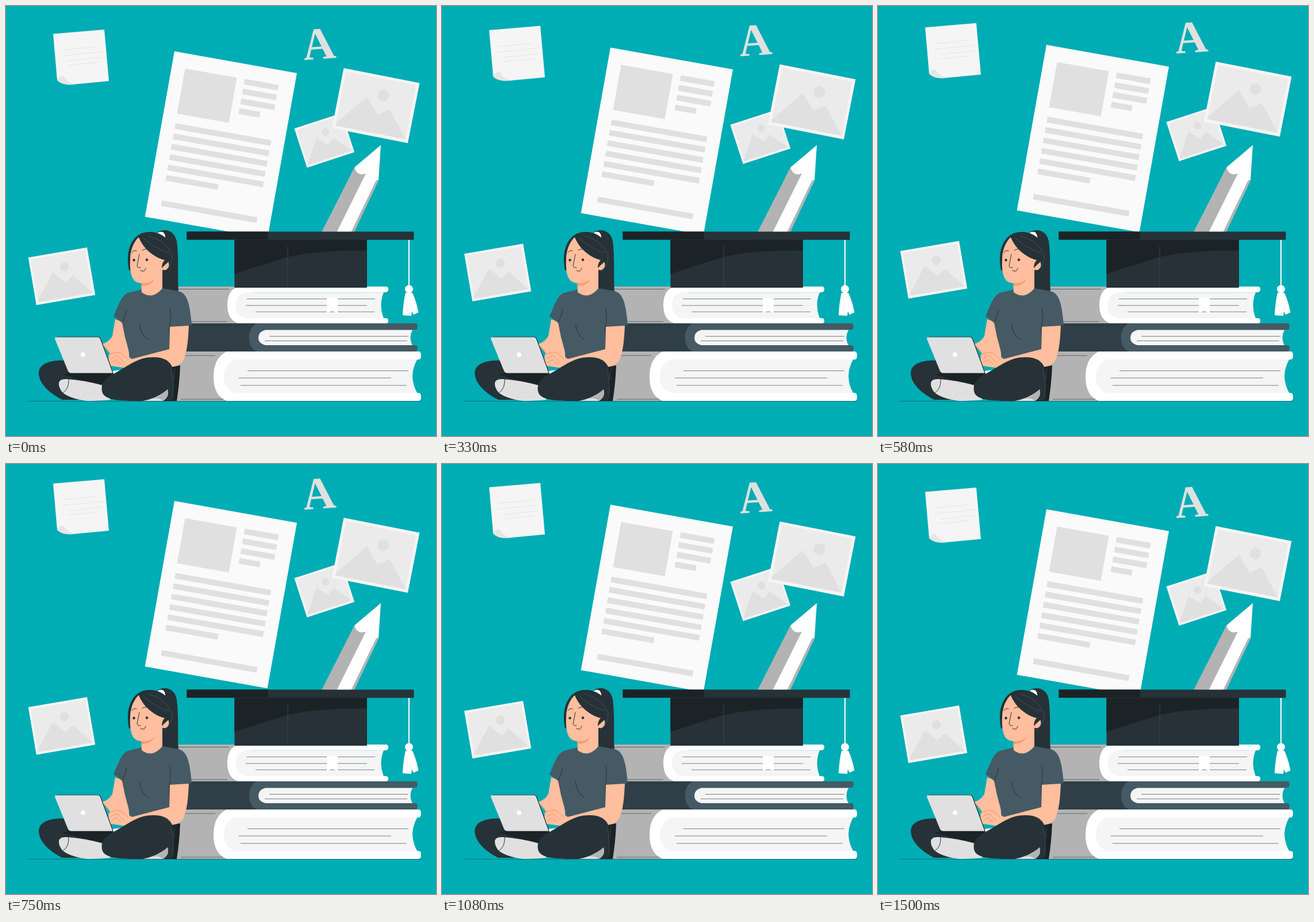
An HTML page for the animation above (1.54 s loop, 748x748 px).

```html
<!DOCTYPE html>
<html lang="en">
<head>
<meta charset="utf-8">
<title>Study time</title>
<style>
  html, body { margin: 0; width: 100%; height: 100%; overflow: hidden; background: #00adb5; }
  svg { display: block; width: 100vw; height: 100vh; }
  .paper { fill: #f5f5f5; }
  .pale { fill: #ebebeb; }
  .grey { fill: #e0e0e0; }
  .mid { fill: #b3b3b3; }
  .white { fill: #fff; }
  .ink { fill: #263238; }
  .deep { fill: #1b2326; }
  .slate { fill: #455a64; }
  .skin { fill: #ffbe9d; }
  .line { fill: none; stroke: #263238; stroke-width: 1; stroke-linecap: round; }
  .thin { fill: none; stroke: #263238; stroke-width: .6; }
  .rule { fill: none; stroke: #e0e0e0; stroke-width: .8; }
  .peach { fill: none; stroke: #f58a5c; stroke-width: .9; stroke-linecap: round; }
</style>
</head>
<body>
<svg viewBox="0 0 748 748" xmlns="http://www.w3.org/2000/svg">
  <defs>
    <g id="photo">
      <path class="paper" d="M0 0H134.5V106.5H0Z"/>
      <path class="pale" d="M5 5H129.5V101H5Z"/>
      <path class="grey" d="M5 97L48.9 41.4L73.5 68L92.3 55L129.5 101H5Z"/>
      <circle class="grey" cx="76.9" cy="33.8" r="10"/>
    </g>
  </defs>

  <rect width="748" height="748" fill="#00adb5"/>

  <g id="floats">
    <!-- sticky note -->
    <path class="paper" d="M82 48.5L171 41L179 130.5L121 136Q98 139 89 129Z"/>
    <path fill="#e6e6e6" d="M89 129Q92 121 100 121.5Q106 133 121 136Q98 139 89 129Z"/>
    <path class="rule" d="M99 76.5L158 71M99 86.5L168 79.5M107 96L167 89M107 103.5L159 98"/>

    <!-- document -->
    <g transform="translate(293 78.7) rotate(10.1)">
      <path fill="#fafafa" d="M0 0H216.4V292.5H0Z"/>
      <rect class="grey" x="23.5" y="26.3" width="91.5" height="79.7"/>
      <g id="text" class="grey"></g>
    </g>

    <text class="grey" transform="translate(547 92) rotate(-4) skewX(3)" text-anchor="middle"
      font-family="'Liberation Serif', serif" font-weight="700" font-size="79">A</text>

    <use href="#photo" transform="translate(501.5 213) rotate(-18) scale(.645 .673)"/>
    <use href="#photo" transform="translate(587.5 108) rotate(11.1)"/>
    <use href="#photo" transform="translate(38.7 437.5) rotate(-9.7) scale(.772 .788)"/>
  </g>

  <!-- pencil -->
  <path class="white" d="M549 394L607 280L652 242L648 303L605 394Z"/>
  <path class="mid" d="M549 394L606 281Q611 297 626 291.5L575 394Z"/>
  <path class="mid" d="M600 394L643 305Q645 301 648 303L605 394Z"/>

  <path class="line" d="M38 687.5H722" opacity=".5" stroke-width=".8"/>

  <!-- top book -->
  <path class="mid" d="M296 488H410V552H296Z"/>
  <path class="white" d="M404 488H661Q665 488 665 492.5T661 498H656Q648 520 656 543H661Q665 543 665 547.5T661 552H404Q385 546 385 520T404 488Z"/>
  <path class="paper" d="M416 498H657Q648 520 657 543H416Q400 538 400 520T416 498Z"/>
  <path d="M428 498.5H655" stroke="#bfe6e8" fill="none"/>
  <path class="thin" d="M419 509.5H642M417 521H628M434 532H641M300 492.5H388M318 549H385"/>
  <path class="white" d="M558 508H577V535L567.5 529.5L558 535Z"/>

  <!-- middle book -->
  <path fill="#303f47" d="M300 552H440V601H300Z"/>
  <path class="slate" d="M436 552H712Q716 552 716 557.5T712 563H707Q700 577 707 590H712Q716 590 716 595.5T712 601H436Q423 595 423 577T436 552Z"/>
  <path class="paper" d="M451 563.5H707Q700 577 707 590H451Q439 587 439 577T451 563.5Z"/>
  <path class="thin" d="M458 574.5H700M450 582.5H698M322 555.5H415M325 598H420"/>

  <!-- bottom book -->
  <path class="mid" d="M290 601H390V687H290Z"/>
  <path class="white" d="M384 601H718Q722 601 722 608T718 615H715Q699 644 715 673H718Q722 673 722 680T718 687H384Q361 678 361 645T384 601Z"/>
  <path class="paper" d="M398 615H715Q699 644 715 673H398Q379 666 379 645T398 615Z"/>
  <path class="thin" d="M420 634.5H700M405 647H670M408 660H697M304 608H364M304 684H378"/>

  <!-- graduation cap -->
  <path class="ink" d="M397.5 406H628V490H397.5Z"/>
  <path class="deep" d="M397.5 406H628V425Q530 425 482 439Q440 452 397.5 466Z"/>
  <path d="M490 418V487" stroke="#37474f"/>
  <path class="ink" d="M314.5 392.5H709.5V406.7H314.5Z"/>
  <path class="deep" d="M314.5 392.5H456V406H314.5Z"/>
  <path d="M701 407V488" stroke="#fff" stroke-width="2"/>
  <circle class="white" cx="701" cy="492.5" r="7"/>
  <path class="white" d="M695 499H707Q714 514 717.5 533L709 537L706 531L705 539L690 538Q691 515 695 499Z"/>

  <!-- ponytail and scalp -->
  <path class="ink" d="M263 394C276 386 293 390 297 409C301 440 298 470 300 496L272 493L264 440Z"/>
  <path class="white" d="M263 395Q269 391 274 394Q278 399 277 405Q271 398 263 395Z"/>
  <path class="ink" d="M214 460C206 422 222 392 250 393C277 393 293 415 291 440Q288 456 270 461Z"/>

  <!-- far arm -->
  <path class="skin" d="M190 545L204 550L214 600V612L182 606L167 588Q180 584 185 574Z"/>

  <!-- shirt -->
  <path class="slate" d="M236 493L272 491L300 496C315 499 320 518 323 555L285 559V618L216 614L213 598Q206 575 202 551L187 540C194 523 201 503 212 499Z"/>
  <path class="line" d="M202 551Q208 538 210 529M285 600L284 559Q288 542 285 526M232 553Q235 575 248 580" stroke-width=".8"/>

  <!-- neck and face -->
  <path class="skin" d="M235 473L262 455H272V491Q255 512 236 498Z"/>
  <path fill="#ff9a6c" d="M235 479Q248 483 258 474Q254 487 236 487Z"/>
  <path class="skin" d="M231 402C222 410 216 425 216 441C215 462 218 477 229 481C245 485 257 480 264 466L272 458L279 443C260 437 240 425 231 402Z"/>
  <ellipse class="skin" cx="275.5" cy="450" rx="8" ry="9.5"/>
  <path class="ink" d="M231 402C240 424 258 437 276 442Q271 447 271 456Q281 445 291 440C290 415 275 394 250 393Z"/>
  <path d="M238 403Q262 424 284 430M248 400Q276 407 289 432Q290 450 279 459" stroke="#4d5f68" fill="none" stroke-width=".7"/>
  <path class="line" d="M232 432L228 452Q229 456 234 455"/>
  <path class="line" d="M219 429Q222 424 227 426M237 425Q243 420 250 426" stroke-width="1.5"/>
  <circle class="ink" cx="222.500" cy="442" r="2.2"/>
  <circle class="ink" cx="245" cy="441.5" r="2.2"/>
  <path class="line" d="M234 460Q241 464 243 456" stroke-width="1.4"/>
  <path fill="#f27a4e" d="M235 461Q239 463 242 460Q240 465 235 461Z"/>

  <!-- hips and left leg -->
  <path class="deep" d="M278 630L303 625Q302 655 297 687H275Z"/>
  <path class="ink" d="M112 617C84 615 58 619 57 638C57 658 78 675 98 685H172L225 640H190L112 638Z"/>
  <path class="deep" d="M110 638H192Q178 651 168 661L117 647Q105 642 98 642Z"/>
  <path class="grey" d="M92 655Q94 648 106 649Q136 651 169 660L182 685Q159 687 141 687Q112 683 99 673Q91 664 92 655Z"/>
  <path class="line" d="M99 673Q110 666 109 649"/>

  <!-- near arm -->
  <path class="skin" d="M285 558L318 556C317 580 315 604 308 617Q302 627 286 628L216 632L203 629L182 626Q177 617 179 606Q189 600 200 602L219 614L284 597Z"/>
  <path class="peach" d="M180 606Q190 601 199 603L212 614M183 613L193 608L205 620M184 620L192 615L200 623M168 591Q176 594 179 602"/>

  <!-- laptop -->
  <path class="white" d="M184 635L202 633Q197 639 187 640Z"/>
  <path class="ink" d="M88 575.5H161Q164.5 576 165.5 580L187 639H112Z"/>
  <path class="grey" d="M87 576.2H159.5Q163 576.500 164 579.5L185.5 638.5H113Q109 638 107.5 634L85 579Q85 576.2 87 576.2Z"/>
  <circle class="white" cx="134" cy="606.5" r="4"/>

  <!-- right leg -->
  <path class="ink" d="M167 670C164 655 175 646 189 639C216 624 231 610 258 611Q283 611 290 630Q294 656 289 686L240 687C205 687 170 688 167 670Z"/>
  <path class="grey" d="M238 687Q264 682 281 667Q285 681 272 687Z"/>
  <path class="mid" d="M255 683Q270 678 281 667Q285 681 272 687Q269 681 255 683Z"/>
  <path d="M286 632Q293 651 290 683M296 628Q290 640 294 650" stroke="#46555d" fill="none" stroke-width=".7"/>
</svg>

<script>
  const SVG = 'http://www.w3.org/2000/svg';
  const text = document.getElementById('text');

  function bar(x, y, width, height = 10) {
    const rect = document.createElementNS(SVG, 'rect');
    for (const [key, value] of Object.entries({ x, y, width, height })) rect.setAttribute(key, value);
    text.append(rect);
  }

  for (let i = 0; i < 4; i++) bar(129, 25.8 + 17.3 * i, i < 3 ? 60 : 37);
  for (let i = 0; i < 6; i++) bar(24, 122.8 + 18.3 * i, i < 5 ? 169 : 92);
  bar(24, 259, 169);

  // Papers rise and sink linearly, stepping at 24 poses per second.
  const LOOP = 1540, HALF = 18, RISE = 0.8;
  const floats = document.getElementById('floats');
  const start = performance.now();

  function draw(now) {
    const t = Math.max(0, now - start) % LOOP;
    const step = Math.min(2 * HALF, Math.floor((t + 4) * 24 / 1000));
    const lift = RISE * (HALF - Math.abs(HALF - step));
    floats.setAttribute('transform', `translate(0 ${-lift})`);
    requestAnimationFrame(draw);
  }
  draw(start);
</script>
</body>
</html>
```
